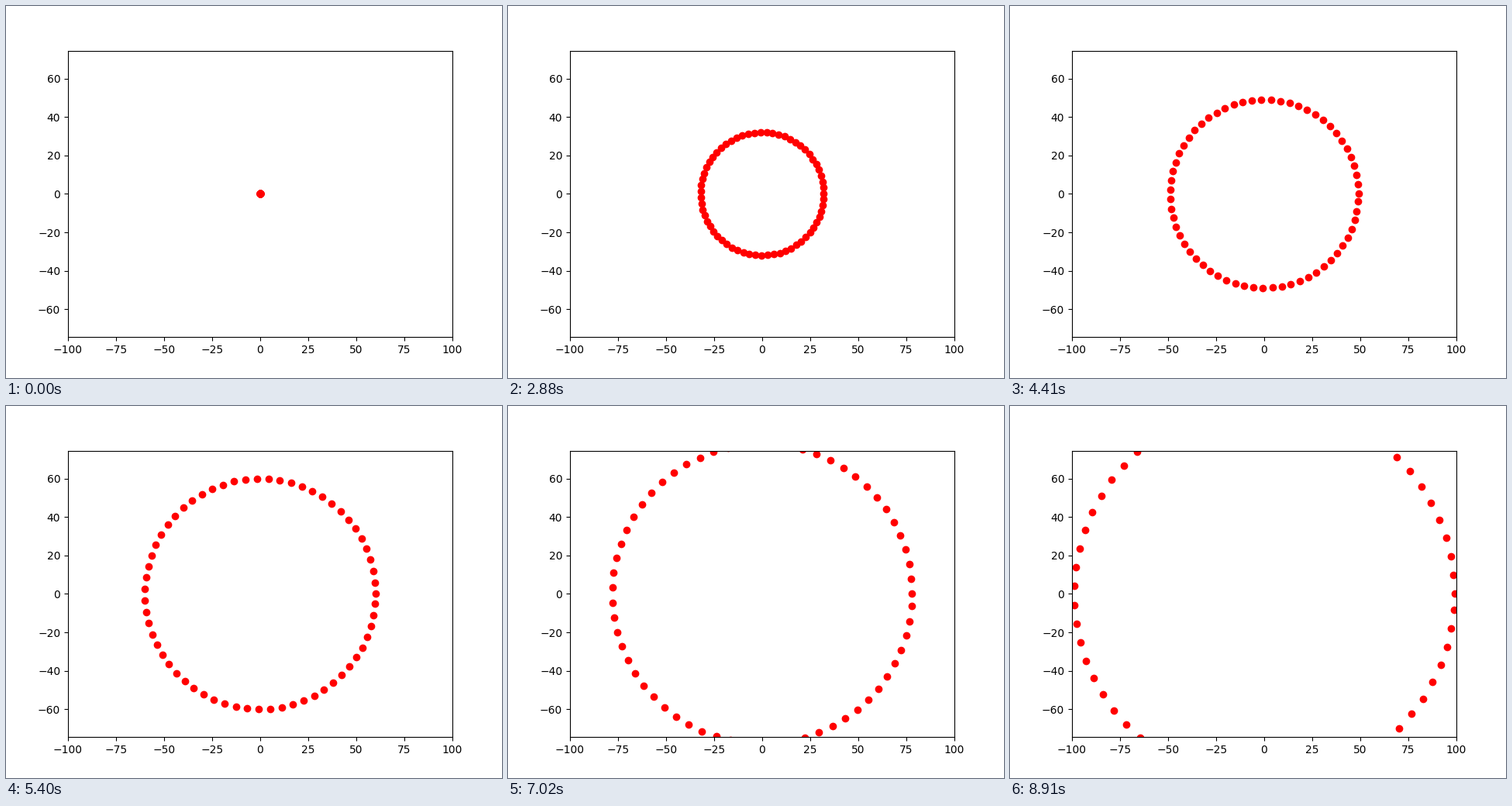
Write a matplotlib script that moves like this. It is 640 px wide and 480 px high and loops after 9000 ms.

```python
import numpy as np
import matplotlib.pyplot as plt
from matplotlib.animation import FuncAnimation

FRAMES = 100
INTERVAL = 90
X_LIMIT = 100

plt.rcParams["font.family"] = "DejaVu Sans"
fig = plt.figure(figsize=(6.4, 4.8), dpi=100)
ax = fig.add_axes([0.125, 0.11, 0.775, 0.77])

# Equal scale on both axes
y_limit = X_LIMIT * (0.77 * 4.8) / (0.775 * 6.4)
ax.set_xlim(-X_LIMIT, X_LIMIT)
ax.set_ylim(-y_limit, y_limit)

angles = np.arange(0, 2 * np.pi, 0.1)
dots, = ax.plot([], [], "ro")


def update(radius):
    dots.set_data(radius * np.cos(angles), radius * np.sin(angles))
    return dots,


anim = FuncAnimation(fig, update, frames=FRAMES, interval=INTERVAL,
                     init_func=lambda: update(0), repeat=True,
                     repeat_delay=0, blit=False)
plt.show()
```
